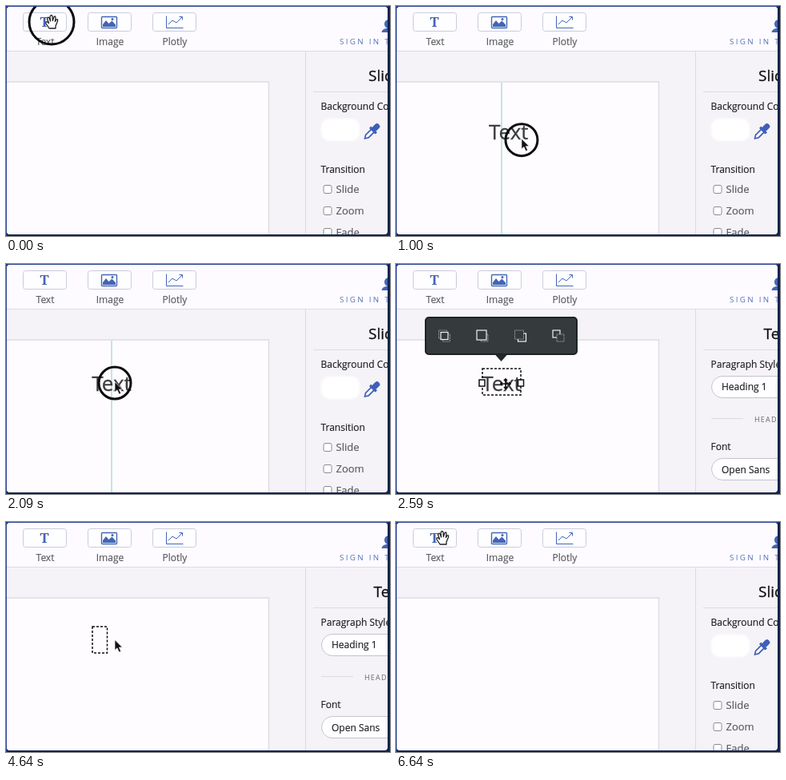
Recreate the animation shown at these times as an HTML page. Size 480x288 px, loop 6.69 s.

```html
<!DOCTYPE html>
<html lang="en">
<head>
<meta charset="utf-8">
<title>Slide editor</title>
<style>
html, body { margin: 0; width: 100%; height: 100%; overflow: hidden; background: #12234f; }
svg { display: block; width: 480px; height: 288px; }
text { font-family: "Open Sans", sans-serif; font-size: 12px; fill: #1c1c1e; stroke: #1c1c1e; stroke-width: .15px; white-space: pre; }
.label { fill: #58585c; stroke: #58585c; text-anchor: middle; }
.title { font-size: 19px; fill: #0c0c0e; stroke-width: .3px; }
.option { font-size: 13px; fill: #58585c; stroke: #58585c; }
.button { fill: #fefdff; stroke: #c9cddb; }
.field { fill: #fefdff; stroke: #c4c4ca; }
.rule { stroke: #dddbe0; fill: none; }
.blue { fill: #4366b5; }
.line { fill: none; stroke: #4366b5; }
</style>
</head>
<body>
<svg viewBox="0 0 480 288">
  <defs>
    <clipPath id="window"><rect x="1" y="1" width="476" height="285" rx="4"/></clipPath>
    <filter id="soft"><feGaussianBlur stdDeviation="1.2"/></filter>
  </defs>
  <path d="M0.5 288V0.5H478" fill="none" stroke="#2c4690"/>
  <g clip-path="url(#window)">
    <rect width="480" height="288" fill="#f5f3f8"/>
    <rect width="480" height="56" fill="#fdfbff"/>
    <path class="rule" d="M0 56.5H480M374.5 57V288"/>
    <rect x="-5" y="95" width="333.5" height="200" fill="#fefcff" stroke="#e0dee3" stroke-width="1.6"/>

    <g id="buttons"></g>
    <text x="48" y="26" text-anchor="middle" style="font:bold 17px 'Noto Serif',serif;fill:#4366b5;stroke:none">T</text>
    <rect class="line" x="119.5" y="13.5" width="19" height="14" rx="1" stroke-width="1.4"/>
    <path class="blue" d="M121 26V23L125 18L128.500 22L132.500 18.500L137 23.500V26Z"/>
    <circle class="blue" cx="133" cy="16.500" r="1.500"/>
    <path class="line" d="M200.500 12.500V27.500H221.500" stroke="#8a9dce"/>
    <path class="line" d="M203 23L208 18L213 21L220 14M216.500 13.500H220.500V17.500"/>
    <g class="blue">
      <circle cx="478.500" cy="22.500" r="5.500"/>
      <path d="M469.500 33Q470 29 475 28H485V33Z"/>
    </g>
    <text x="417" y="48" style="font-size:9.800px;letter-spacing:2.300px;fill:#5673b9;stroke:none">SIGN IN TO</text>

    <path class="rule" d="M384 107.500H480"/>
    <g id="slidePanel">
      <text class="title" x="453" y="94">Slide</text>
      <text x="393.500" y="130">Background Color</text>
      <rect x="394" y="141" width="48" height="28" rx="11" fill="#fff" filter="url(#soft)"/>
      <g transform="translate(457 157.500) rotate(45)">
        <path d="M-2.500 -2V8L0 12L2.500 8V-2" fill="#f7f8fc" stroke="#4060b8" stroke-width="1.700"/>
        <rect x="-5.500" y="-4.500" width="11" height="3.500" rx="1" fill="#3f5fb9"/>
        <rect x="-3.500" y="-13" width="7" height="10" rx="3.300" fill="#3f5fb9"/>
      </g>
      <text x="393.500" y="209">Transition</text>
      <g id="options"></g>
    </g>
    <g id="textPanel">
      <text class="title" x="459.500" y="94">Text</text>
      <text x="393.500" y="130">Paragraph Style</text>
      <rect class="field" x="394.500" y="140.500" width="110" height="27" rx="13.500"/>
      <text x="407" y="158">Heading 1</text>
      <path class="rule" d="M394 193.500H434" stroke="#ccc"/>
      <text x="448" y="198" style="font-size:9px;letter-spacing:1.200px;fill:#666;stroke:none">HEADING</text>
      <text x="393.500" y="233">Font</text>
      <rect class="field" x="394.500" y="243.500" width="110" height="27" rx="13.500"/>
      <text x="407" y="262">Open Sans</text>
    </g>

    <path id="guide" d="M132 96V288" stroke="#a9dcdc" stroke-width="1.400"/>
    <text id="word" style="font-size:26px;fill:#3c3c3e;stroke:#3c3c3e;stroke-width:.3px"></text>
    <rect id="frame" x="108" y="131" height="33" fill="none" stroke="#111" stroke-width="1.500" stroke-dasharray="3 2"/>
    <g id="handles" fill="#fff" stroke="#111" stroke-width="1.500">
      <rect x="104" y="145" width="7" height="8"/>
      <rect x="152.500" y="145" width="7" height="8"/>
    </g>
    <g id="toolbar">
      <rect x="37" y="67" width="189" height="46" rx="4" fill="#353a3d" stroke="#1e2224" stroke-width="2"/>
      <path d="M123.500 113H139.500L131.500 122Z" fill="#24282a"/>
      <g id="tools" fill="none" stroke="#f0f0f0"></g>
    </g>

    <circle id="ring" fill="none" stroke="#0a0a0c" stroke-width="3"/>
    <path id="arrow" d="M0 0V13L3 10.300L5.300 15.500L7.700 14.400L5.400 9.500H9.500Z" fill="#111" stroke="#fff" stroke-width=".700"/>
    <path id="move" d="M-6 0H6M0 -6V6M-4 -2L-6 0L-4 2M4 -2L6 0L4 2M-2 -4L0 -6L2 -4M-2 4L0 6L2 4" fill="none" stroke="#111" stroke-width="1.700"/>
    <path id="hand" d="M-3 8L-7 2Q-8 -1 -5 0L-3.500 1.500L-5.500 -4Q-5 -7 -3 -5L-1.500 -1L-2 -7Q0 -10 1 -7L1.300 -1.500L3 -6.500Q5 -8 5 -5L4.300 -.500L6 -3Q8 -4 7.500 -1L5 5V8Z" fill="#fff" stroke="#222" stroke-width="1.300" stroke-linejoin="round"/>
  </g>
</svg>
<script>
const LOOP = 6690;
const $ = id => document.getElementById(id);
const show = (id, on) => $(id).style.display = on ? "" : "none";
const place = (id, [x, y]) => $(id).setAttribute("transform", `translate(${x} ${y})`);

$("buttons").innerHTML = ["Text", "Image", "Plotly"].map((name, i) => {
  const x = 21.5 + i * 81;
  return `<rect class="button" x="${x}" y="8.500" width="54" height="23" rx="3"/>
    <text class="label" x="${x + 27.5}" y="49">${name}</text>`;
}).join("");

$("options").innerHTML = ["Slide", "Zoom", "Fade"].map((name, i) => {
  const y = 224.5 + i * 27;
  return `<rect x="397" y="${y}" width="10" height="10" rx="2" fill="#fff" stroke="#8c8c90"/>
    <text class="option" x="412.500" y="${y + 9.5}">${name}</text>`;
}).join("");

// Each tool: a list of squares as [x, y, size, dashed]
const tools = [
  [[-7, -7, 10, 1], [-2, -2, 9, 1], [-4.5, -4.5, 9, 0]],
  [[-2, -2, 9, 1], [-7, -7, 12, 0]],
  [[-3, -3, 10, 0], [-7, -7, 11, 1]],
  [[-7, -7, 9, 0], [-2, -2, 9, 1]]
];
$("tools").innerHTML = tools.map((squares, i) =>
  `<g transform="translate(${60.5 + i * 47.5} 90)">` + squares.map(([x, y, size, dashed]) =>
    `<rect x="${x}" y="${y}" width="${size}" height="${size}" fill="#353a3d"
      ${dashed ? 'stroke-dasharray="1 1" stroke="#bbb"' : 'stroke-width="1.200"'}/>`).join("") + "</g>"
).join("");

// Keyframes are [time, x, y], joined with smooth easing
const cursorPath = [
  [50, 57, 20], [510, 181, 173], [640, 181, 173], [1330, 136, 163], [1480, 136, 163],
  [2000, 136, 149], [5850, 136, 149], [6430, 58, 20]
];
const wordPath = [
  [50, 2, 7], [510, 126, 160], [640, 126, 160], [1330, 107.3, 174], [1480, 107.3, 174], [2000, 107.3, 159]
];

function along(path, t) {
  const next = path.findIndex(key => key[0] > t);
  if (next === 0) return path[0].slice(1);
  if (next < 0) return path[path.length - 1].slice(1);
  const [t0, x0, y0] = path[next - 1], [t1, x1, y1] = path[next];
  const u = (t - t0) / (t1 - t0), k = u * u * (3 - 2 * u);
  return [x0 + (x1 - x0) * k, y0 + (y1 - y0) * k];
}

function draw(t) {
  const pos = along(cursorPath, t);
  const released = t >= 2400;
  const editing = t >= 3650;
  const selected = released && t < 6230;
  const hand = t < 180 || t >= 6350;
  const moving = t >= 2500 && !editing;
  const letters = Math.max(0, Math.min(4, 4 - Math.floor((t - 4150) / 100)));

  show("slidePanel", !selected);
  show("textPanel", selected);
  show("guide", t >= 350 && !released);
  show("toolbar", released && !editing);
  show("handles", released && !editing);
  show("frame", released && t < 5850);
  show("word", t >= 180);
  show("hand", hand);
  show("move", moving);
  show("arrow", !hand && !moving);
  show("ring", t < 2460);

  $("word").textContent = "Text".slice(0, letters);
  place("word", along(wordPath, t));
  const width = letters === 4 ? 48 : Math.max(18.5, $("word").getComputedTextLength());
  $("frame").setAttribute("width", width);

  const press = Math.min(1, Math.max(0, (t - 40) / 100));
  const release = Math.min(1, Math.max(0, (t - 2380) / 80));
  $("ring").setAttribute("r", 28 - 8 * press + 8 * release);
  $("ring").setAttribute("opacity", 1 - release);
  place("ring", pos);
  place("hand", pos);
  place("arrow", [pos[0], pos[1] - 1.5]);
  place("move", [pos[0] + 1, pos[1] + 1]);
}

const start = performance.now();
function tick() {
  draw((performance.now() - start) % LOOP);
  requestAnimationFrame(tick);
}
tick();
</script>
</body>
</html>
```
